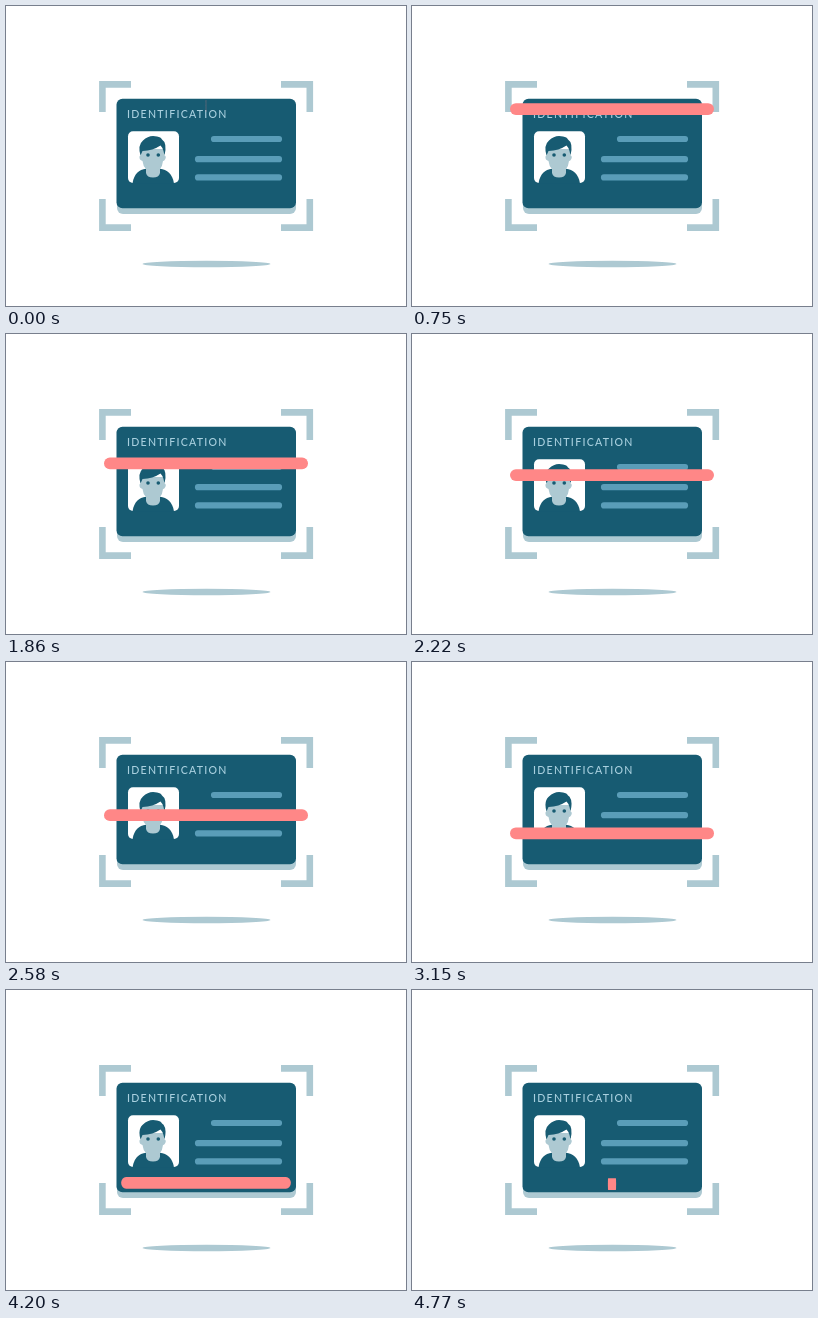
Write an HTML page that moves like this. It is 400 px wide and 300 px high and loops after 4800 ms.

```html
<!DOCTYPE html>
<html lang="en">
<head>
<meta charset="utf-8">
<title>ID card scan</title>
<style>
  html, body { margin: 0; height: 100%; overflow: hidden; background: #fff; }
  svg { display: block; width: 100%; height: 100%; }
  text { font: 500 10.6px Lato, sans-serif; letter-spacing: 1.26px; }
</style>
</head>
<body>
<svg viewBox="0 0 400 300">
  <g fill="none" stroke="#adc9d2" stroke-width="6.6">
    <path d="M96.4 106V78.4H125M275 78.4H303.8V106M303.8 193V221.6H275M125 221.6H96.4V193"/>
  </g>
  <ellipse cx="200.5" cy="258" rx="64" ry="3.2" fill="#adc9d2"/>

  <rect x="111" y="100" width="179" height="108" rx="6" fill="#adc9d2"/>
  <rect x="110.5" y="92.8" width="179.5" height="109.4" rx="6" fill="#175b72"/>
  <text x="121" y="112" fill="#a9d0df">IDENTIFICATION</text>
  <path d="M208 133H273M192 153.2H273M192 171.4H273" stroke="#5a9db8" stroke-width="6.2" stroke-linecap="round"/>

  <rect x="122" y="125.3" width="51" height="51.7" rx="5" fill="#fff"/>
  <g fill="#175b72">
    <path d="M126.5 177.5C128 168 133 163.5 140 162.8H154C161 163.5 166.500 168 168 177.5Z"/>
    <path fill="#adc9d2" d="M135 143H158V149Q161 150 159 153.500Q158 155 157 155Q156.500 160 154 163V167Q153 171.500 147 171.500T140 167V163Q137 160 136.500 155Q133 154 133.500 150.500Q134 149 135 149Z"/>
    <path d="M134.500 149.500Q131.500 139 137 134.500Q143 128.500 151 130.500Q155 131 156 133.500Q161.500 137 158.500 149.500L157.500 145Q157 142 154.500 139.500Q147 144.500 136.500 145Z"/>
    <circle cx="142" cy="149" r="1.8"/>
    <circle cx="152.300" cy="149" r="1.8"/>
  </g>

  <rect id="bar" x="-102" y="-5.9" width="204" height="11.8" rx="5.9" fill="#ff8787"/>
</svg>
<script>
  const LOOP = 4800, GROW = 720, REST = 300;
  const TOP = 100, BOTTOM = 194.2;
  const bar = document.getElementById('bar');
  const clamp = v => Math.min(1, Math.max(0, v));
  const smooth = v => v * v * (3 - 2 * v);

  function draw() {
    const t = performance.now() % LOOP;
    const width = clamp(Math.min(t, LOOP - t) / GROW);
    const fall = smooth(clamp((t - REST) / (LOOP - 2 * REST)));
    const y = TOP + (BOTTOM - TOP) * fall;
    bar.setAttribute('transform', `translate(200 ${y}) scale(${width} 1)`);
    requestAnimationFrame(draw);
  }
  draw();
</script>
</body>
</html>
```
